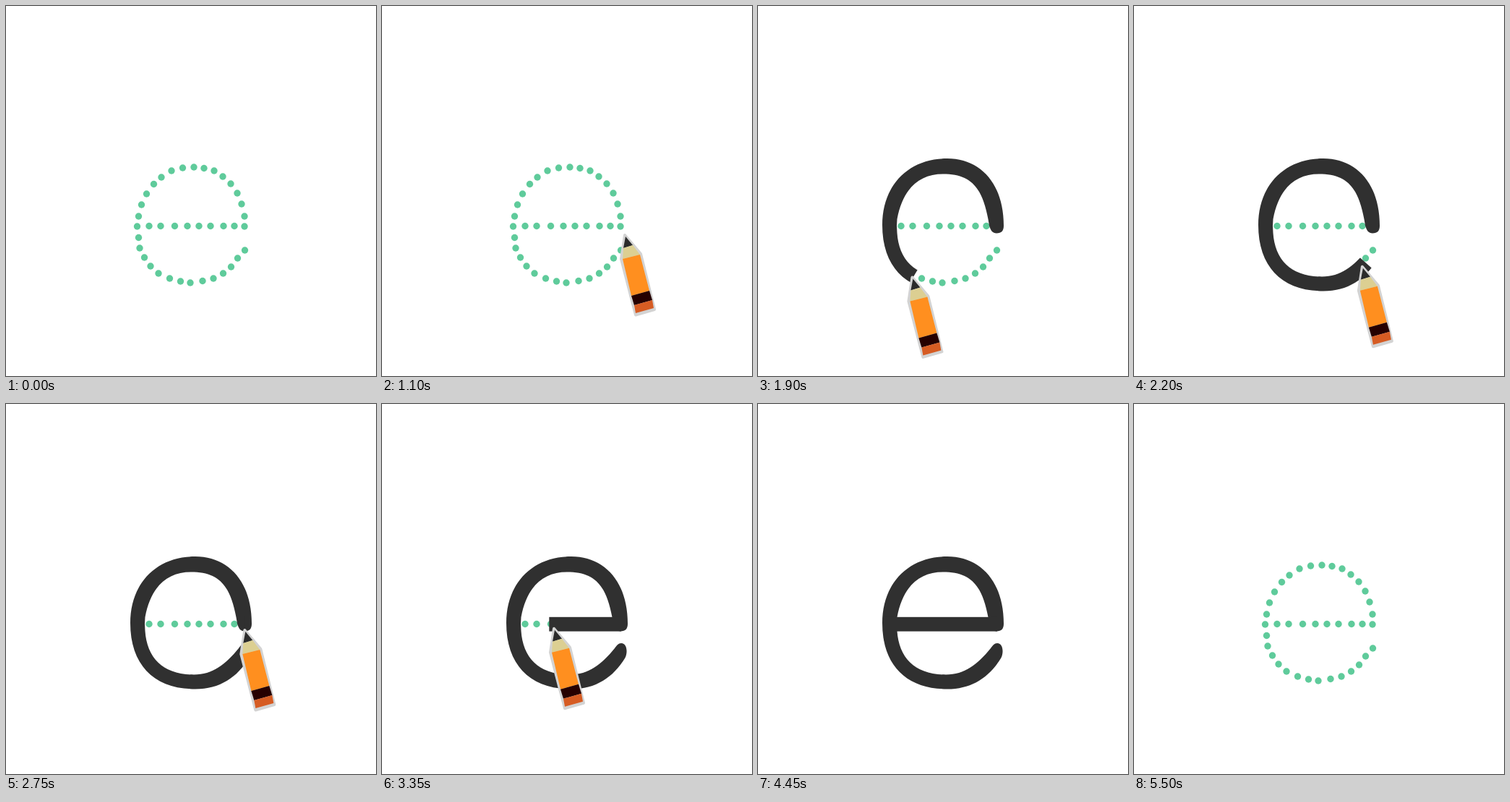
An HTML page that plays this animation: 512 px wide and 512 px high, repeating every 8.5 s.

```html
<!DOCTYPE html>
<html lang="en">
<head>
<meta charset="utf-8">
<title>Tracing the letter e</title>
<style>
  html, body { margin: 0; width: 100%; height: 100%; overflow: hidden; background: #fff; }
  svg { display: block; width: 100%; height: 100%; }
</style>
</head>
<body>
<svg viewBox="0 0 512 512">
  <defs>
    <mask id="reveal" maskUnits="userSpaceOnUse" x="0" y="0" width="512" height="512">
      <path id="track" fill="none" stroke="#fff" stroke-width="34"
        d="M331 316 L330 304 C329 251 303 222 259 222 C211 222 182 255 182 303
           C182 356 212 384.5 260 384.5 C293 384.5 312 366 331 341 L339 330"/>
    </mask>
  </defs>
  <g id="dots" fill="#5fcb9b"></g>
  <g id="letter" fill="#303030">
    <path mask="url(#reveal)"
      d="M340 304 C340 246 308 211 262 211 C206 211 172 250 172 303
         C172 362 206 394.5 262 394.5 C296 394.5 320 378 336 352
         C340 346 340 331 331 331 C327 331 325 334 322 338
         C304 360 286 374.5 260 374.5 C218 374.5 195 352 192.5 314 L192 304 L192.5 295
         C200 254 222 232.5 256 232.5 C294 232.5 310 250 318.5 295 L320 304
         C322 311 325 314.5 330 314.5 C337 314.5 340 311 340 304 Z"/>
    <rect id="bar" y="294.8" height="19.8"/>
  </g>
  <g id="pencil">
    <path d="M0 1 L22 27 L41 104 L15 111.5 L-5 34 Z" fill="#d3d3d3" stroke="#d3d3d3" stroke-width="4" stroke-linejoin="round"/>
    <path d="M1 3 L-2 19 L11 15 Z" fill="#2b2b2b"/>
    <path d="M-2 19 L11 15 L21 28 L-3 34 Z" fill="#dccf92"/>
    <path d="M-3 34 L21 28 L34 78 L9 85 Z" fill="#ff8f1f"/>
    <path d="M9 85 L34 78 L38 91 L13 98 Z" fill="#260000"/>
    <path d="M13 98 L38 91 L40 102 L15 109 Z" fill="#d65c23"/>
  </g>
</svg>
<script>
const LOOP = 8500, STEP = 50;
const SHOW = 1000, LIFT = 4450, RESET = 5500;
const START_CAP = 12, END_CAP = 13.6;

const $ = id => document.getElementById(id);
const track = $("track"), bar = $("bar"), letter = $("letter"), pencil = $("pencil");
const total = track.getTotalLength();
const main = total - START_CAP - END_CAP;

const ring = [
  [330, 305], [330, 291], [326, 274], [320, 259], [311, 246], [300, 236], [288, 228], [274, 224.5],
  [260, 223], [244.5, 224], [229, 228], [215, 237], [204.5, 246.5], [194.5, 260], [187.5, 275],
  [183.5, 291], [181.5, 305], [183.5, 320.5], [185, 335], [191.5, 348], [200, 360], [211, 370],
  [226.5, 377], [241.5, 381], [255, 383], [272, 380.5], [287, 377], [300.5, 370], [311.5, 361],
  [320.5, 349], [330.5, 338]
];
const row = [198, 214, 233.5, 251, 267, 283, 301, 316].map(x => [x, 304.5]);
$("dots").innerHTML = [...ring, ...row]
  .map(([x, y]) => `<circle cx="${x}" cy="${y}" r="4.7"/>`).join("");

const lerp = (a, b, k) => a + (b - a) * k;

// Quadratic in-out easing over [from, to]; mid is the share spent speeding up.
function ease(t, from, to, mid = 0.5) {
  const x = Math.min(1, Math.max(0, (t - from) / (to - from)));
  return x < mid ? x * x / mid : 1 - (1 - x) ** 2 / (1 - mid);
}

// The tip trails slightly behind the ink on the curve.
function curveTip(p) {
  const pt = track.getPointAtLength(START_CAP + p * (main - 6));
  return [pt.x + 6 * (1 - p), pt.y + 12 * (1 - p)];
}

function draw(t) {
  const curve = ease(t, 1123, 2375);
  const hop = ease(t, 2375, 2700);
  const line = ease(t, 2700, 3986, 0.33);

  letter.style.display = t >= SHOW && t < RESET ? "" : "none";
  const ink = curve <= 0 ? 0 : curve >= 1 ? total : START_CAP + curve * main;
  track.setAttribute("stroke-dasharray", `${ink} 2000`);
  bar.setAttribute("x", 331 - 157 * line);
  bar.setAttribute("width", 157 * line);

  pencil.style.display = t >= SHOW && t < LIFT ? "" : "none";
  let [x, y] = curveTip(curve);
  x = lerp(lerp(x, 331, hop), 184.5, line);
  y = lerp(lerp(y, 312, hop), 308.5, line);
  pencil.setAttribute("transform", `translate(${x} ${y})`);
}

const begin = performance.now();
function tick() {
  const t = (performance.now() - begin) % LOOP;
  draw(Math.floor(t / STEP) * STEP);
  requestAnimationFrame(tick);
}
tick();
</script>
</body>
</html>
```
